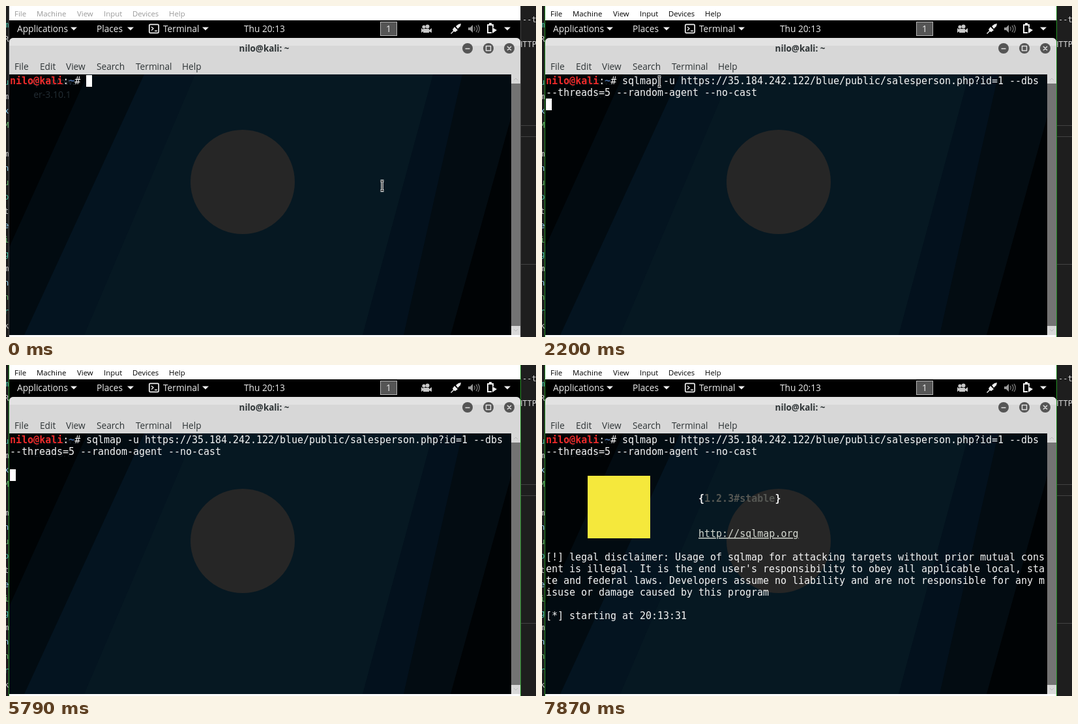
An HTML page that plays this animation: 813 px wide and 508 px high, repeating every 7.99 s.

```html
<!DOCTYPE html>
<html lang="en">
<head>
<meta charset="utf-8">
<title>Terminal session</title>
<style>
html, body { margin: 0; width: 100%; height: 100%; overflow: hidden; background: #1e1e1e; }
svg { display: block; }
text { white-space: pre; }
.host { font: 11.4px "Open Sans", sans-serif; }
.panel { font: 13.7px "Open Sans", sans-serif; fill: #eee; }
.menu { font: 13.7px "Open Sans", sans-serif; fill: #2e3436; }
.title { font: bold 13.4px "Open Sans", sans-serif; fill: #2e3436; }
.term { font: 15px "DejaVu Sans Mono", monospace; fill: #f4f4f4; }
.code { font: 12px "DejaVu Sans Mono", monospace; fill: #d4d4d4; }
.ghost { font: 14px "Open Sans", sans-serif; fill: #222d34; text-anchor: middle; }
.b { font-weight: bold; }
</style>
</head>
<body>
<svg width="813" height="508" viewBox="0 0 813 508">
  <rect width="813" height="508" fill="#1e1e1e"/>
  <g id="edge" class="code"></g>

  <!-- editor behind, right side -->
  <g class="code">
    <text x="792" y="25">--t</text>
    <text x="785" y="63">HTTP</text>
    <path d="M789 183.5h24M789 200.5h24M789 396.5h24" stroke="#424242"/>
  </g>

  <!-- virtual machine window -->
  <rect x="5" width="784" height="508" fill="#fff"/>
  <rect x="5" y="22" width="784" height="483"/>
  <path id="border" d="M4.500 0V508M789.500 0V508"/>
  <g id="hostMenu" class="host"></g>

  <g id="panel" class="panel"></g>
  <g fill="none" stroke="#eee" stroke-width="1.7">
    <rect x="219.8" y="28.3" width="14.4" height="13" rx="1.5"/>
    <path d="M223 32l3 2.8l-3 2.8M228 38.2h4" stroke-width="1.4"/>
  </g>
  <rect x="574.5" y="24.5" width="25" height="21" fill="#555" stroke="#b5b5b5"/>
  <text x="583" y="40" class="panel">1</text>
  <g fill="#eee">
    <g fill="#c8c8c8">
      <circle cx="641" cy="32" r="2.6"/><circle cx="646.5" cy="31.5" r="3"/>
      <path d="M640 35h9v6h-9zM649 37l4-3v7l-4-2zM637 34l3 2v3l-3 2z"/>
    </g>
    <path d="M682 42l4-4l-1-2l3-4l5 5l-4 3l-2-1l-4 4zM690 31l4-3l4-1l-1 4l-4 4z"/>
    <path d="M738 28h3v-2h4v2h3v5h-3v9h-7z"/>
    <path d="M740 30h6v10h-6z" fill="#000"/>
    <path d="M746 33l7 4l-7 5z"/>
    <path d="M709 33h3l4-4v12l-4-4h-3z" fill="#999"/>
    <path d="M718 32q2.5 3 0 6M721 30q4 5 0 10M724 29q4.5 6 0 12" fill="none" stroke="#777" stroke-width="1.3"/>
  </g>

  <!-- terminal window -->
  <path d="M5 105V56q0-7 7-7h770q7 0 7 7v49z" fill="#d7d7d7"/>
  <path d="M5 61v-5q0-7 7-7h770q7 0 7 7v5z" fill="#e2e2e2"/>
  <text x="396" y="70" text-anchor="middle" class="title">nilo@kali: ~</text>
  <g fill="#555"><circle cx="708" cy="65" r="8"/><circle cx="740" cy="65" r="8"/><circle cx="772" cy="65" r="8"/></g>
  <path d="M704.5 65.5h7M736.5 61.5h7v7h-7zM769 62l6 6m0-6l-6 6" fill="none" stroke="#e0e0e0" stroke-width="1.5"/>
  <g id="menu" class="menu"></g>

  <svg x="5" y="105" width="770" height="400" viewBox="5 105 770 400">
    <rect x="5" y="105" width="770" height="400" fill="#061822"/>
    <path d="M5 105H290L120 505H5z" fill="#041420"/>
    <path d="M5 105H212L28 505H5z" fill="#020b11"/>
    <path d="M5 105H125L5 370z" fill="#000305"/>
    <path d="M655 105H775V505H547z" fill="#03111d"/>
    <path d="M700 105H775V505H610z" fill="#030c12"/>
    <path d="M775 170V505H682z" fill="#000305"/>
    <circle cx="363" cy="270" r="80" fill="#262626"/>
    <g id="ghost" class="ghost">
      <text x="71" y="121">sqlitebrows</text>
      <text x="71" y="141">er-3.10.1</text>
    </g>
  </svg>
  <rect x="775" y="105" width="14" height="400" fill="#d8d8d8"/>
  <rect x="775" y="119" width="14" height="372" fill="#737373"/>
  <path d="M779 114l3-3l3 3M779 496l3 3l3-3" fill="none" stroke="#bbb"/>

  <g class="term">
    <text x="6" y="120"><tspan class="b" fill="#ee2a2a">nilo@kali</tspan>:<tspan class="b" fill="#45689c">~</tspan>#</text>
    <g id="command"></g>
    <g id="banner">
      <rect x="70" y="170" width="96" height="96" fill="#f5e83c"/>
      <text x="240" y="210" class="b">{<tspan fill="#555753">1.2.3#stable</tspan>}</text>
      <text x="240" y="264" fill="#d3d7cf" text-decoration="underline">http://sqlmap.org</text>
    </g>
  </g>
  <rect id="block" width="9" height="18" fill="#fff"/>
  <g id="pointer" fill="none" stroke="#fff" stroke-width="3.4">
    <path id="beam" d="M-2.500-7.500h2l.5.5l.5-.5h2M0-7V7M-2.500 7.500h2l.5-.5l.5.5h2"/>
    <path d="M-2.500-7.500h2l.5.5l.5-.5h2M0-7V7M-2.500 7.500h2l.5-.5l.5.5h2" stroke="#000" stroke-width="1.2"/>
  </g>
</svg>
<script>
const LOOP = 7990;
const CELL = 9;
const $ = id => document.getElementById(id);

function add(parent, tag, attrs, text = "") {
  const el = document.createElementNS("http://www.w3.org/2000/svg", tag);
  for (const name in attrs) el.setAttribute(name, attrs[name]);
  el.textContent = text;
  $(parent).append(el);
}

function row(parent, y, items) {
  for (const [text, x] of Object.entries(items)) add(parent, "text", { x, y }, text);
}

// Terminal text sits on a fixed character grid
function line(parent, n, text, left = 6) {
  const x = [...text].map((_, i) => left + CELL * i).join(" ");
  add(parent, "text", { x, y: 120 + 18 * n }, text);
}

row("hostMenu", 16, { File: 13, Machine: 47, View: 109, Input: 150, Devices: 194, Help: 250 });
row("panel", 40, { Applications: 17, Places: 139, Terminal: 241, "Thu 20:13": 365 });
row("menu", 98, { File: 13, Edit: 52, View: 92, Search: 139, Terminal: 199, Help: 270 });

for (const x of [104, 191, 306, 769]) add("panel", "path", { d: `M${x - 5} 32.5h10l-5 5z` });

// Slivers of editor text left of the window, one per 22px line
[..."mR  umxM mnupteigmnnrk"].forEach((letter, i) => {
  const fill = ["#4ec9b0", "#d4d4d4", "#9cdcfe", "#6fbf73"][i % 4];
  add("edge", "text", { x: -3, y: 33 + 22 * i, fill }, letter);
});

line("command", 0, "sqlmap -u https://35.184.242.122/blue/public/salesperson.php?id=1 --dbs", 123);
line("command", 1, "--threads=5 --random-agent --no-cast");
[
  "[!] legal disclaimer: Usage of sqlmap for attacking targets without prior mutual cons",
  "ent is illegal. It is the end user's responsibility to obey all applicable local, sta",
  "te and federal laws. Developers assume no liability and are not responsible for any m",
  "isuse or damage caused by this program",
  "",
  "[*] starting at 20:13:31"
].forEach((text, i) => line("banner", 10 + i, text));

// [start time, x, y]; no position means hidden
const pointerStops = [[0, 577, 276], [500, 328, 169], [660, 304, 188], [1080, 273, 170], [1230, 180, 116], [5790]];
const blockStops = [
  [0, 123, 106], [2200, 6, 142], [2610], [3320, 6, 142], [3840], [4520, 6, 142], [5110],
  [5670, 6, 142], [5790, 6, 160], [6380], [6930, 6, 160], [7490]
];

const show = (id, on) => $(id).setAttribute("visibility", on ? "visible" : "hidden");

function place(id, stops, t) {
  const [, x, y] = stops.findLast(stop => stop[0] <= t);
  show(id, x !== undefined);
  if (x !== undefined) $(id).setAttribute("transform", `translate(${x} ${y})`);
}

const start = performance.now();

function draw() {
  const t = Math.max(0, performance.now() - start) % LOOP;
  const focused = t >= 800;
  $("hostMenu").setAttribute("fill", focused ? "#000" : "#999");
  $("border").setAttribute("stroke", focused ? "#259025" : "#444");
  $("ghost").setAttribute("opacity", t < 2200 ? 1 : 0.5);
  show("command", t >= 2200);
  show("banner", t >= 7870);
  place("pointer", pointerStops, t);
  place("block", blockStops, t);
  requestAnimationFrame(draw);
}
draw();
</script>
</body>
</html>
```
